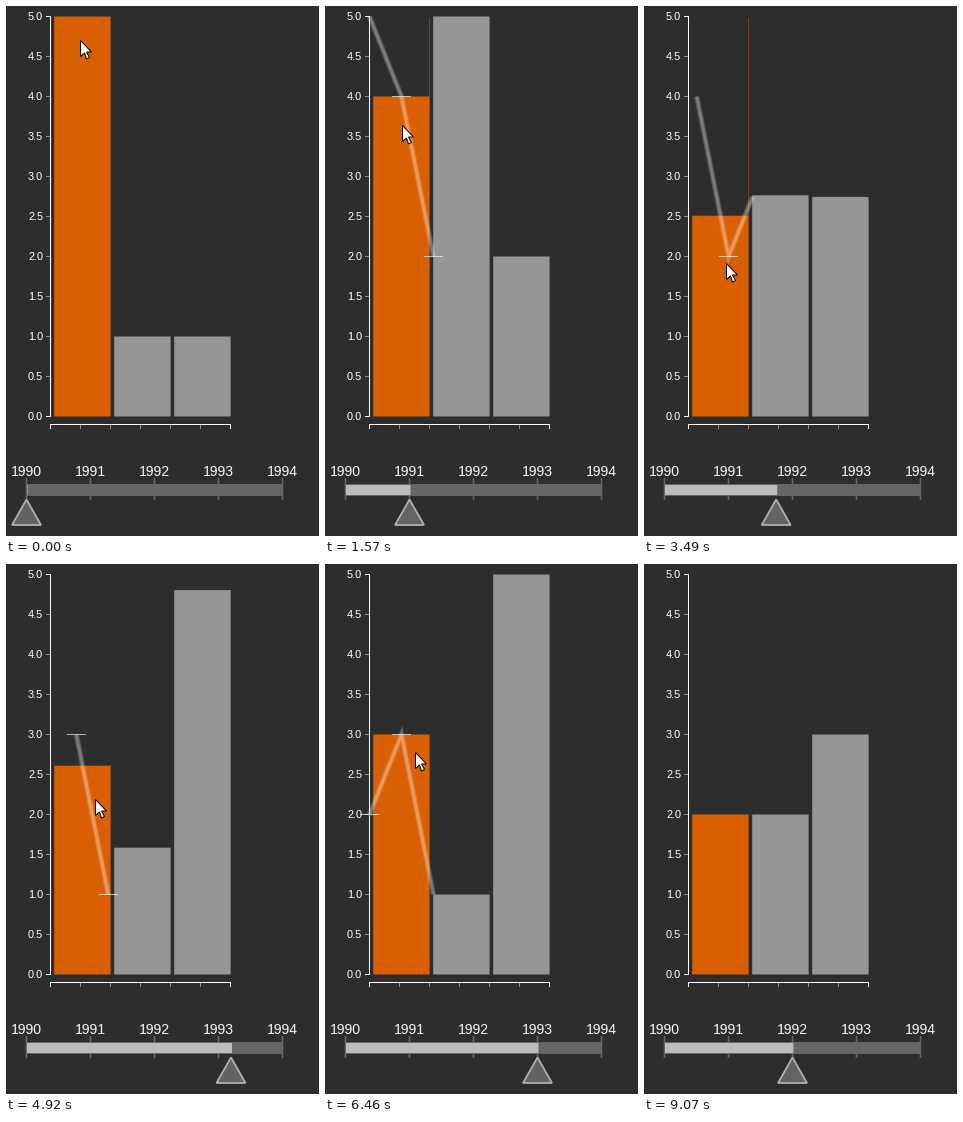
Write a matplotlib script that moves like this. It is 313 px wide and 530 px high and loops after 9.26 s.

```python
import math

import matplotlib.pyplot as plt
import numpy as np
from matplotlib.animation import FuncAnimation
from matplotlib.patches import Polygon, Rectangle

WIDTH, HEIGHT, DPI = 313, 530, 100
LOOP_MS, FRAME_MS = 9260, 20
STEPS = 66  # the picture is renewed this often in a loop
PX = 72 / DPI
BACKGROUND, ORANGE, GREY = "#2c2e2d", "#d95f02", "#969696"

# Bar heights for 1990 to 1994
VALUES = np.array([[5, 4, 2, 3, 1], [1, 5, 2, 1, 4], [1, 2, 3, 5, 4]])
BAR_LEFT, BAR_WIDTH, BAR_STEP = 48.2, 56.4, 60
HINT_X, HINT_STEP = 76.5, 32
SLIDER_X, SLIDER_STEP = 20.5, 64

DRAG_START, DRAG_END, CURSOR_LEAVES = 3, 58, 64
# Turning points of the drag: (step, years since 1990)
DRAG = [(3, 0), (19, 2), (20, 2), (22, 1.31), (35, 3.195), (41, 4), (51, 2)]
# Hand on the first bar: (step, x, distance below the bar's top)
HAND = [(0, 74, 24), (11, 77, 29), (20, 74, 22), (25, 82, 48), (35, 89, 34),
        (46, 90, 18)]
EXIT = np.array([265, 520])


def follow(keys, step):
    steps, *tracks = zip(*keys)
    return np.array([np.interp(step, steps, track) for track in tracks])


def year_at(step):
    return round(float(follow(DRAG, step)[0]), 6)


def value_y(value):
    return 410.5 - 80 * value


def bar_top(row, year):
    return value_y(np.interp(year, range(5), VALUES[row]))


def hand_at(step):
    """The cursor rides on the first bar, then leaves at the lower right."""
    held = min(step, DRAG_END)
    x, gap = follow(HAND, held)
    grip = np.array([x, bar_top(0, year_at(held)) + gap])
    leaving = np.clip((step - DRAG_END) / (CURSOR_LEAVES - DRAG_END), 0, 1)
    return np.floor(grip + (EXIT - grip) * leaving)


def segments(pairs):
    """Join separate segments into one broken polyline."""
    xs, ys = [], []
    for (x0, y0), (x1, y1) in pairs:
        xs += [x0, x1, np.nan]
        ys += [y0, y1, np.nan]
    return xs, ys


fig = plt.figure(figsize=(WIDTH / DPI, HEIGHT / DPI), dpi=DPI, facecolor=BACKGROUND)
ax = fig.add_axes([0, 0, 1, 1])
ax.set_xlim(0, WIDTH)
ax.set_ylim(HEIGHT, 0)
ax.axis("off")


def line(xs, ys, color, width=1, **kwargs):
    return ax.plot(xs, ys, color=color, lw=width * PX, snap=False,
                   solid_capstyle="butt", solid_joinstyle="miter", **kwargs)[0]


def label(x, y, text, size, align, color):
    ax.text(x, y, text, family="Liberation Sans", fontsize=size * PX,
            ha=align, va="baseline", color=color)


def draw_axes():
    ticks = np.arange(0, 5.1, 0.5)
    line(*segments([((40, value_y(v)), (44, value_y(v))) for v in ticks]), "#8f9090")
    line(*segments([((x, 419), (x, 423)) for x in np.arange(44.5, 225, 30)]), "#8f9090")
    line([40, 44.5, 44.5, 40], [10.5, 10.5, 410.5, 410.5], "white")
    line([44.5, 44.5, 224.5, 224.5], [423, 418.5, 418.5, 423], "white")
    for v in ticks:
        label(37.3, value_y(v) + 4, f"{v:.1f}", 11, "right", "white")


def draw_slider():
    xs = [SLIDER_X + SLIDER_STEP * k for k in range(5)]
    line(*segments([((x, 472), (x, 494)) for x in xs]), "#666666", 1.6)
    ax.add_patch(Rectangle((20, 478), 257, 12, fc="#666666", lw=0, zorder=3))
    for k, x in enumerate(xs):
        label(x, 470, str(1990 + k), 14, "center", "#f0f6fc")


draw_axes()
draw_slider()
progress = ax.add_patch(Rectangle((21, 479), 0, 10, fc="#bfbbbc", lw=0,
                                  snap=False, zorder=4))
handle = ax.add_patch(Polygon([(0, 0)] * 3, fc="#636363", ec="#b0b0b0",
                              lw=1.8 * PX, joinstyle="miter", zorder=5))
bars = [ax.add_patch(Rectangle((BAR_LEFT + BAR_STEP * i, 0), BAR_WIDTH, 0, lw=0,
                               fc=GREY if i else ORANGE, snap=False, zorder=3))
        for i in range(3)]
trail = line([], [], "#7d3f0f", zorder=2)
glows = [line([], [], "white", width, alpha=0.15, zorder=6) for width in (5.4, 3.8, 2.2)]
marks = line([], [], "white", alpha=0.65, zorder=7)
ARROW = np.array([(0, 0), (0, 16), (4, 12.5), (6, 18.5), (9, 17), (6, 11.5),
                  (11, 11.5)]) + 0.5
cursor = ax.add_patch(Polygon(ARROW, fc="white", ec="black", lw=PX,
                              joinstyle="miter", snap=False, zorder=9))


def set_hint(year, direction, visible):
    """Draw the path of the first bar through one year on either side."""
    first, last = max(0, math.ceil(year - 1)), min(4, year + 1)
    years = np.arange(first, math.floor(last) + 1)
    path = np.append(years, last)
    for glow in glows:
        glow.set_data(HINT_X + HINT_STEP * (path - year), bar_top(0, path))

    # A mark stays while its year lies ahead or has only just been passed
    ahead = (years - year) * direction
    near = years[(ahead > -0.5) & (ahead <= 1)]
    ends = zip(HINT_X + HINT_STEP * (near - year), bar_top(0, near))
    marks.set_data(*segments([((x - 9.5, y), (x + 9.5, y)) for x, y in ends]))
    for artist in (*glows, marks):
        artist.set_visible(visible)


def update(frame):
    step = round((frame + 0.5) * FRAME_MS * STEPS / LOOP_MS)
    year = year_at(step)
    direction = -1 if year < year_at(step - 1) else 1

    for row, bar in enumerate(bars):
        top = bar_top(row, year)
        bar.set_y(top)
        bar.set_height(410.5 - top)
    trail.set_data([104.5, 104.5], [12, bar_top(0, year)])
    trail.set_visible(DRAG_START < step < 34)
    set_hint(year, direction, DRAG_START <= step < DRAG_END)

    x = SLIDER_X + SLIDER_STEP * year
    progress.set_width(max(0, x - 20))
    handle.set_xy([(x, 493.5), (x + 14.5, 519), (x - 14.5, 519)])

    cursor.set_xy(ARROW + hand_at(step))
    cursor.set_visible(step <= CURSOR_LEAVES)
    return [*bars, trail, *glows, marks, progress, handle, cursor]


animation = FuncAnimation(fig, update, frames=LOOP_MS // FRAME_MS, interval=FRAME_MS,
                          repeat=True, repeat_delay=0, blit=False)
plt.show()
```
